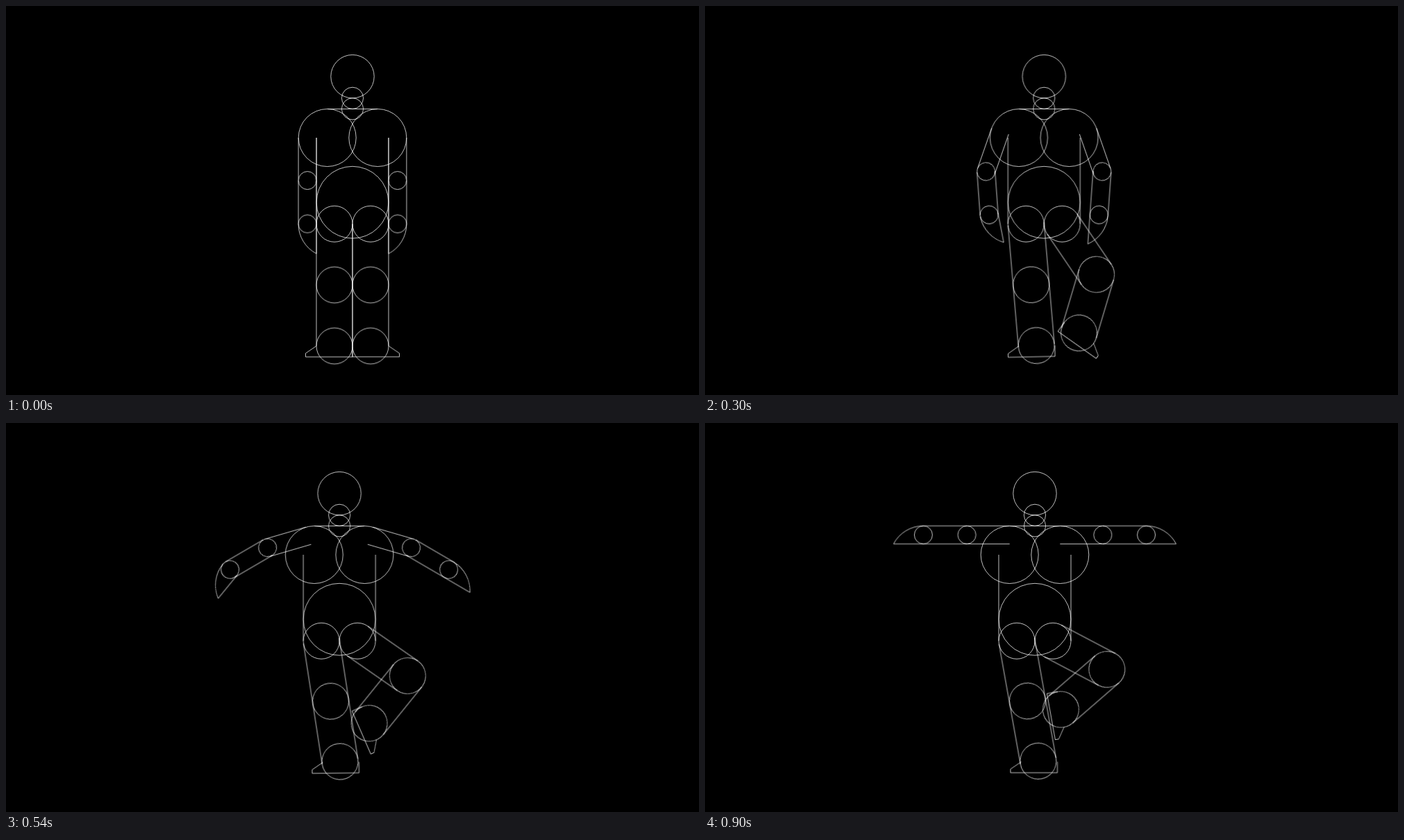
Recreate the animation shown at these times as an HTML page without scripts. Size 998 px wide and 561 px high, loop 2700 ms.

```html
<!DOCTYPE html>
<html lang="en">
<head>
<meta charset="utf-8">
<title>Balance pose</title>
<style>
  html, body { margin: 0; width: 100%; height: 100%; overflow: hidden; background: #000; }
  svg { display: block; width: 100%; height: 100%; fill: none; stroke: #fff; stroke-width: .75; }

  .body, .swing, .elbow, .hand, .toe { animation: 2.7s linear infinite; transform-origin: 0 0; }
  .body { animation-name: shift; animation-timing-function: cubic-bezier(.2, .13, .55, 1); }
  .swing { animation-name: swing; }
  .elbow { animation-name: elbow; }
  .hand { animation-name: hand; }
  .toe { animation-name: toe; }

  .arm { --to: 90deg; animation-timing-function: cubic-bezier(.58, 0, .28, 1); }
  .thigh { --to: 62.2deg; animation-timing-function: cubic-bezier(.31, 0, .19, 1); }
  .shin { --to: -111.2deg; animation-timing-function: cubic-bezier(.36, 0, .22, .93); }
  .stand { --to: -10.1deg; animation-timing-function: cubic-bezier(.34, 0, .24, 1); }
  .sole { --to: 10.1deg; animation-timing-function: cubic-bezier(.34, 0, .4, 1); }

  /* movement takes 900 ms, then the pose holds */
  @keyframes shift {
    0% { transform: translateX(0); }
    33.333%, 100% { transform: translateX(-24px); }
  }
  @keyframes swing {
    0% { transform: rotate(0deg); }
    33.333%, 100% { transform: rotate(var(--to)); }
  }
  @keyframes elbow {
    0% { transform: rotate(0deg); animation-timing-function: cubic-bezier(.42, 0, .75, .62); }
    11.111% { transform: rotate(-23.4deg); }
    33.333%, 100% { transform: rotate(0deg); }
  }
  @keyframes hand {
    0%, 4.444% { transform: rotate(0deg); animation-timing-function: cubic-bezier(.42, 0, .75, .62); }
    17.778% { transform: rotate(-24deg); }
    33.333%, 100% { transform: rotate(0deg); }
  }
  @keyframes toe {
    0%, 4.444% { transform: rotate(0deg); animation-timing-function: cubic-bezier(.1, .45, .3, 1); }
    33.333%, 100% { transform: rotate(-30.8deg); }
  }
</style>
</head>
<body>
<svg viewBox="0 0 998 561">
  <g transform="translate(499 0)">
    <g class="body">
      <!-- head and torso -->
      <circle cy="101.6" r="31.2"/>
      <circle cy="132.8" r="15.6"/>
      <circle cy="148.4" r="15.6"/>
      <circle cx="-36.3" cy="190" r="41.5"/>
      <circle cx="36.3" cy="190" r="41.5"/>
      <circle cy="283.2" r="51.9"/>
      <circle cx="-26" cy="314.3" r="26"/>
      <circle cx="26" cy="314.3" r="26"/>
      <path d="M-36.3 148.5H36.3M-52 190V314.3M52 190V314.3"/>

      <!-- left arm -->
      <g transform="translate(-36.3 190)">
        <g class="swing arm">
          <path d="M-41.6 0V61.6M-15.6 0V61.6"/>
          <circle cx="-28.6" cy="61.6" r="13"/>
          <g transform="translate(-28.6 61.6)">
            <g class="elbow">
              <path d="M-13 0V62.6M13 0V62.6"/>
              <circle cy="62.6" r="13"/>
              <g transform="translate(0 62.6)">
                <g class="hand"><path d="M-13 0A48.6 48.6 0 0 0 13 43V0"/></g>
              </g>
            </g>
          </g>
        </g>
      </g>

      <!-- right arm, mirrored -->
      <g transform="translate(36.3 190) scale(-1 1)">
        <g class="swing arm">
          <path d="M-41.6 0V61.6M-15.6 0V61.6"/>
          <circle cx="-28.6" cy="61.6" r="13"/>
          <g transform="translate(-28.6 61.6)">
            <g class="elbow">
              <path d="M-13 0V62.6M13 0V62.6"/>
              <circle cy="62.6" r="13"/>
              <path d="M-13 62.6a48.6 48.6 0 0 0 26 43V62.6"/>
            </g>
          </g>
        </g>
      </g>

      <!-- standing leg -->
      <g transform="translate(-26 314.3)">
        <g class="swing stand">
          <path d="M-26 0V176M26 0V176"/>
          <circle cy="88" r="26"/>
          <circle cy="176" r="26"/>
          <g transform="translate(-7 184.6)">
            <g class="swing sole"><path d="M-19-8.6L-34.5 1.9V7.1H33V-8.6"/></g>
          </g>
        </g>
      </g>

      <!-- raised leg, mirrored -->
      <g transform="translate(26 314.3) scale(-1 1)">
        <g class="swing thigh">
          <path d="M-26 0V88M26 0V88"/>
          <circle cy="88" r="26"/>
          <g transform="translate(0 88)">
            <g class="swing shin">
              <path d="M-26 0V88M26 0V88"/>
              <circle cy="88" r="26"/>
              <g transform="translate(0 88)">
                <g class="toe"><path d="M-26 0L-41.5 10.5V15.7H26V0"/></g>
              </g>
            </g>
          </g>
        </g>
      </g>
    </g>
  </g>
</svg>
</body>
</html>
```
